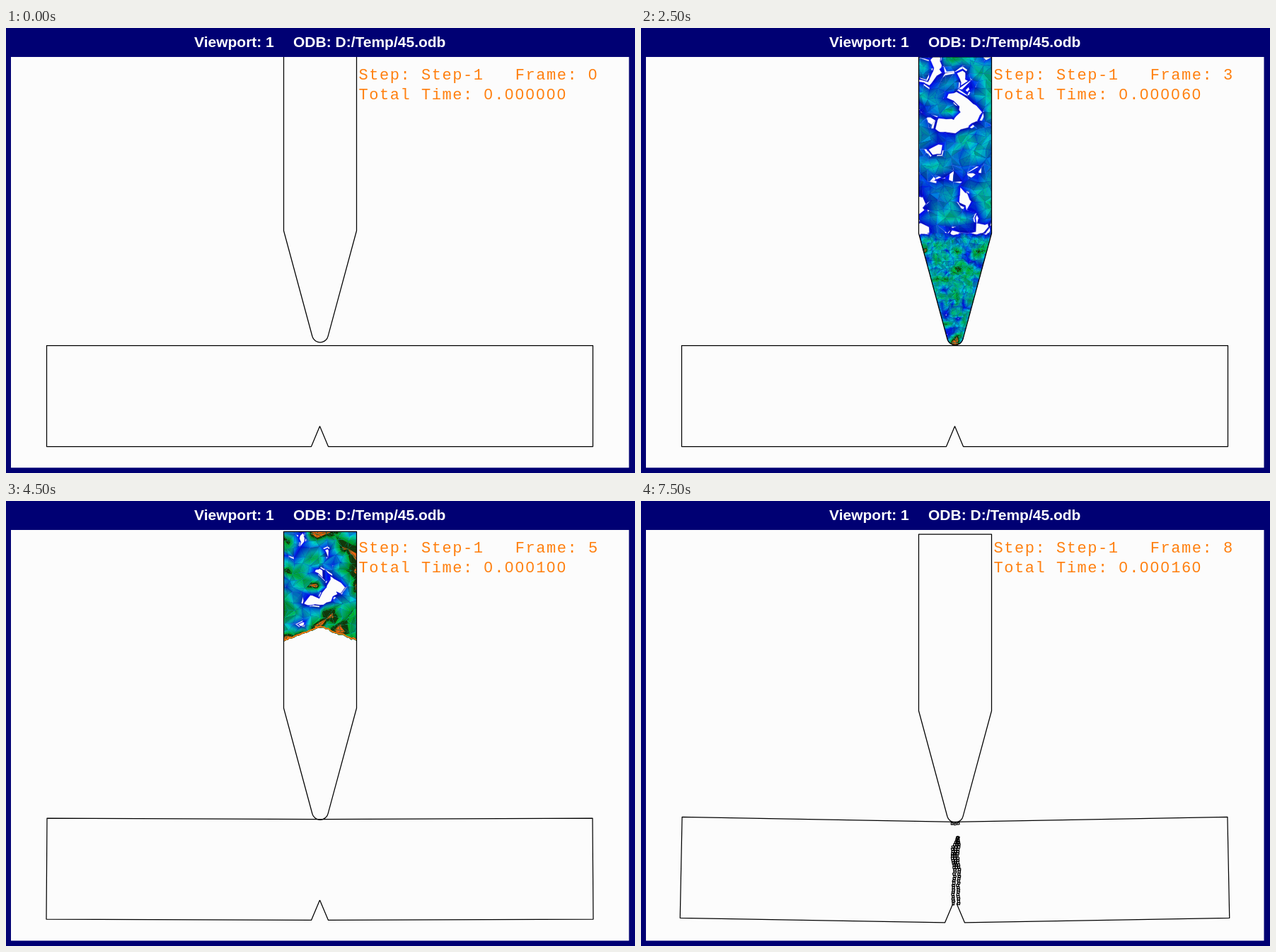
An HTML page with a canvas that plays this animation: 889 by 630 pixels, repeating every 8000 ms.

```html
<!DOCTYPE html>
<html lang="en">
<head>
<meta charset="utf-8">
<title>Impact simulation</title>
<style>
  html, body { margin: 0; width: 100%; height: 100%; overflow: hidden; background: #000073; }
  canvas, svg { position: absolute; left: 0; top: 0; width: 889px; height: 630px; }
  text { white-space: pre; font-kerning: none; }
  .title { font: bold 21px "Liberation Sans", Arial, sans-serif; fill: #fff; }
  .info { font: 22px "Liberation Mono", "Courier New", monospace; letter-spacing: 1.55px; fill: #ff8010; }
  .zero { font-family: "Liberation Sans", Arial, sans-serif; letter-spacing: 2.515px; }
</style>
</head>
<body>
<canvas id="stage" width="889" height="630"></canvas>
<svg viewBox="0 0 889 630">
  <text class="title" x="266" y="27">Viewport: 1</text>
  <text class="title" x="406" y="27">ODB: D:/Temp/45.odb</text>
  <text class="info" id="step" x="498.4" y="73"></text>
  <text class="info" id="time" x="498.4" y="101"></text>
</svg>
<script>
const ctx = document.getElementById('stage').getContext('2d');
const stepText = document.getElementById('step');
const timeText = document.getElementById('time');

const LOOP = 8000, STEP = 1000;
const MID = 444, SHOULDER = 287, TIP = 447;
const SPEED = 1.25;           // punch travel per step
const CONTACT = 3, BREAK = 8; // steps of first touch and of the crack
const CUTOFF = 0.23;          // stress below this is not shown
const HOT_SPOTS = [[447, 340], [401, 311], [444, 440]];

const hash = (a, b, c = 0) => {
  const s = Math.sin(a * 127.1 + b * 311.7 + c * 74.7) * 43758.5453;
  return s - Math.floor(s);
};
const lerp = (a, b, f) => a + (b - a) * f;
const smooth = f => { f = Math.max(0, Math.min(1, f)); return f * f * (3 - 2 * f); };

function noise(x, y, size, seed) {
  const i = Math.floor(x / size), j = Math.floor(y / size);
  const fx = smooth(x / size - i), fy = smooth(y / size - j);
  const row = k => lerp(hash(i, k, seed), hash(i + 1, k, seed), fx);
  return lerp(row(j), row(j + 1), fy);
}

// Final stress: coarse and low in the shaft, fine and high in the cone
function stress(x, y) {
  const cone = smooth((y - 278) / 26);
  const shaft = 0.47 + 0.2 * Math.exp((30 - y) / 25) + 1.05 * (noise(x, y, 19, 3) - 0.5);
  const point = 0.72 + 0.95 * (noise(x, y, 8, 7) - 0.5);
  const peaks = HOT_SPOTS.reduce((sum, [px, py]) =>
    sum + 0.75 * Math.exp(-((x - px) ** 2 + (y - py) ** 2) / 36), 0);
  return lerp(shaft, point, cone) + peaks + 0.16 * (hash(x, y) - 0.5);
}

function colour(u, shade) {
  if (u > 0.97) return '#ea6510';
  if (u > 0.86) return '#12380c';
  const f = (u - CUTOFF) / 0.57;
  return `hsl(${240 - 98 * f}, 100%, ${(45 - 11 * f) * shade}%)`;
}

function buildMesh(top, bottom, size) {
  const cols = Math.ceil(112 / size) + 1, rows = Math.ceil((bottom - top) / size);
  const node = (i, j) => {
    const inner = j > 0 && j < rows ? 0.7 : 0;
    const x = 386 + size * (i + 0.7 * (hash(i, j, 11) - 0.5));
    const y = lerp(top, bottom, j / rows) + size * inner * (hash(i, j, 23) - 0.5);
    return { x, y, v: stress(x, y) };
  };
  const cells = [];
  for (let j = 0; j < rows; j++) for (let i = 0; i < cols; i++) {
    const a = node(i, j), b = node(i + 1, j), c = node(i + 1, j + 1), d = node(i, j + 1);
    const pairs = hash(i, j, 31) < 0.5 ? [[a, b, c], [a, c, d]] : [[a, b, d], [b, c, d]];
    pairs.forEach((pts, k) => cells.push({
      pts,
      shade: 0.76 + 0.32 * hash(i, j, 41 + k),
      striped: size > 8 && hash(i, j, 51 + k) < 0.3
    }));
  }
  return cells;
}
const mesh = [...buildMesh(30, SHOULDER, 11), ...buildMesh(SHOULDER, TIP, 5)];

// Keep the part of a polygon whose stress is above a level
function above(poly, level) {
  const out = [];
  poly.forEach((p, i) => {
    const q = poly[(i + 1) % poly.length];
    if (p.u >= level) out.push(p);
    if ((p.u >= level) !== (q.u >= level)) {
      const f = (level - p.u) / (q.u - p.u);
      out.push({ x: lerp(p.x, q.x, f), y: lerp(p.y, q.y, f), u: level });
    }
  });
  return out;
}

function fillPoly(poly, style) {
  ctx.beginPath();
  poly.forEach(p => ctx.lineTo(p.x, p.y));
  ctx.closePath();
  ctx.fillStyle = ctx.strokeStyle = style;
  ctx.fill();
  ctx.stroke();
}

function punchPath() {
  ctx.beginPath();
  ctx.moveTo(392.5, 37);
  ctx.lineTo(392.5, SHOULDER);
  ctx.lineTo(432.9, 436.5);
  ctx.arc(MID, 433.5, 11.5, Math.PI - 0.26, 0.26, true);
  ctx.lineTo(495.5, SHOULDER);
  ctx.lineTo(495.5, 37);
  ctx.closePath();
}

// Impact wave climbing the punch; nothing is shown behind it
function waveFront(n, x) {
  const jag = 2.5 * (hash(Math.round(x / 3), n) - 0.5);
  return 342 - 170 * (n - 4) + 0.38 * Math.abs(x - MID) + jag;
}

function traceFront(n) {
  ctx.beginPath();
  for (let x = 380; x <= 508; x += 3) ctx.lineTo(x, waveFront(n, x));
}

function drawStress(n) {
  const growth = (n / 4) ** 0.8;
  ctx.save();
  punchPath();
  ctx.clip();
  traceFront(n);
  ctx.lineTo(508, 0);
  ctx.lineTo(380, 0);
  ctx.clip();
  ctx.lineWidth = 0.4;
  for (const { pts, shade, striped } of mesh) {
    let poly = pts.map(({ x, y, v }) => {
      const gap = Math.abs(waveFront(n, x) - y);
      return { x, y, u: v * growth + 0.4 * Math.exp(-gap / 7) };
    });
    for (let k = 0; k < 18; k++) {
      const level = CUTOFF + 0.045 * k;
      poly = above(poly, level);
      if (poly.length < 3) break;
      fillPoly(poly, striped && k === 1 ? '#fff' : colour(level + 0.02, shade));
    }
  }
  traceFront(n);
  ctx.strokeStyle = '#f07810';
  ctx.lineWidth = 4;
  ctx.stroke();
  ctx.restore();
}

function drawPunch(n) {
  ctx.save();
  ctx.translate(0, SPEED * n);
  drawStress(n);
  punchPath();
  ctx.stroke();
  ctx.restore();
}

// The beam bends: middle sinks, ends rise, foot spreads
function drawBeam(n) {
  const sink = 0.35 * Math.max(0, n - CONTACT) ** 1.65;
  const rise = sink * 0.45;
  const split = n >= BREAK ? 2.5 : 0;
  ctx.beginPath();
  for (const side of [-1, 1]) {
    const at = d => MID - 0.5 + side * d;
    ctx.moveTo(at(split), 563.7 + sink * 1.2);
    ctx.lineTo(at(12 + split * 0.8), 592.5 + sink * 0.9);
    ctx.lineTo(at(386 + rise), 592.5 - rise);
    ctx.lineTo(at(386 - Math.min(0.6, rise)), 449.5 - rise);
    ctx.lineTo(at(0), 449.5 + sink);
  }
  ctx.stroke();
}

function drawChip(x, y, size, seed) {
  ctx.beginPath();
  for (let k = 0; k < 4; k++) {
    const a = k * Math.PI / 2 + 0.8 + 0.7 * (hash(seed, k) - 0.5);
    ctx.lineTo(x + size * Math.cos(a), y + size * Math.sin(a));
  }
  ctx.closePath();
  ctx.stroke();
}

// Winding crack: packed at the top, two strands below
function drawCrack() {
  let seed = 1;
  for (let y = 477; y < 572; y += 3.2) {
    const f = (y - 477) / 95;
    const x = 445.3 + 2.6 * (1 - f) * Math.cos(f * 12);
    const width = Math.min(3.4, f * 25);
    for (const s of f < 0.45 ? [-1, 0, 1] : [-1, 1]) {
      drawChip(x + s * width + 1.4 * (hash(++seed, 3) - 0.5), y, 2.3, seed);
    }
  }
  for (let i = -1; i <= 1; i++) drawChip(MID + 4.5 * i, 457.5 - Math.abs(i), 2, i);
}

const markZeros = s => s.replace(/0+/g, '<tspan class="zero">$&</tspan>');

function draw(n) {
  ctx.fillStyle = '#000073';
  ctx.fillRect(0, 0, 889, 630);
  ctx.save();
  ctx.beginPath();
  ctx.rect(7, 41, 873.5, 581.5);
  ctx.clip();
  ctx.fillStyle = '#fcfcfc';
  ctx.fillRect(0, 0, 889, 630);
  ctx.strokeStyle = '#000';
  ctx.lineWidth = 1.25;
  ctx.lineJoin = 'round';
  drawBeam(n);
  drawPunch(n);
  if (n >= BREAK) drawCrack();
  ctx.restore();
  stepText.innerHTML = markZeros(`Step: Step-1   Frame: ${n}`);
  timeText.innerHTML = markZeros(`Total Time: ${(n * 0.00002).toFixed(6)}`);
}

let shown = -1;
function tick() {
  const n = Math.floor((performance.now() % LOOP + STEP / 2) / STEP);
  if (n !== shown) draw(shown = n);
  requestAnimationFrame(tick);
}
tick();
</script>
</body>
</html>
```
